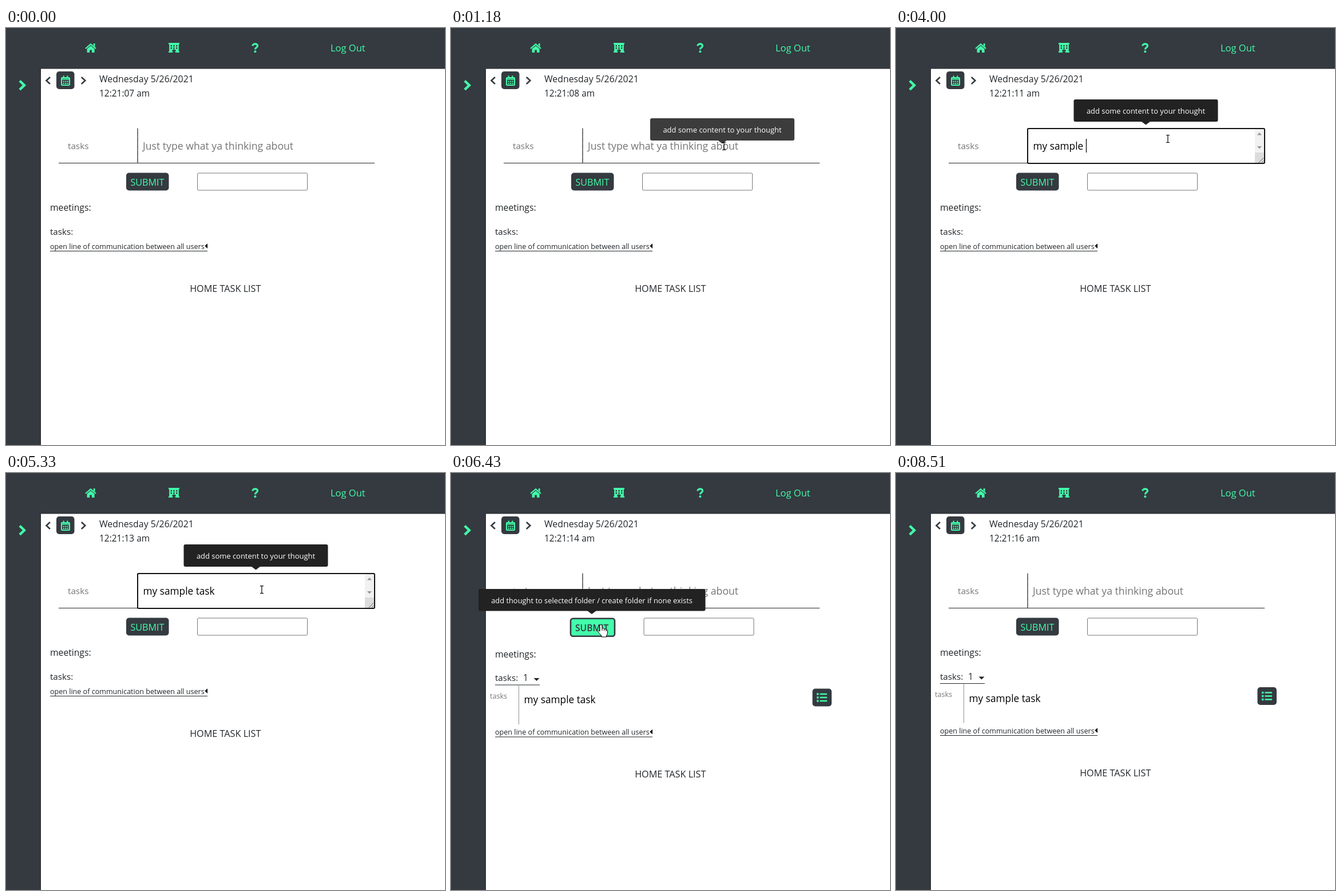
These frames come from a looping animation (767 by 730 pixels, 8.9 s). An HTML page:

```html
<!DOCTYPE html>
<html lang="en">
<head>
<meta charset="utf-8">
<title>Task planner</title>
<style>
  html, body { margin: 0; width: 100%; height: 100%; overflow: hidden; background: #fff; }
  svg { display: block; font-family: "Open Sans", "Noto Sans", sans-serif; fill: #212529; }
  text { white-space: pre; }
  .dark { fill: #343a40; }
  .green { fill: #43fdaa; }
  .line { fill: none; stroke: #343a40; }
  .line.green { stroke: #43fdaa; }
  .hint { fill: #757575; }
  .rule { stroke: #212529; fill: none; }
  .typed { font-size: 17.25px; fill: #000; }
  .tip { fill: #222; }
  .tip text { fill: #fff; }
  .cursor { fill: #fff; stroke: #000; stroke-linejoin: round; }
</style>
</head>
<body>
<svg width="767" height="730" viewBox="0 0 767 730">
  <rect class="dark" width="767" height="71"/>
  <rect class="dark" width="61" height="730"/>
  <path d="M767 71H60.5V730" fill="none" stroke="#24282c"/>

  <!-- navigation -->
  <path class="line green" d="M139 36L148 28.3L157 36" stroke-width="2.2"/>
  <path class="green" d="M152.8 27h2.7v6l-2.7-2.4zM141.6 36.6L148 31.2L154.6 36.6V43H150V38.4H146.2V43H141.6z"/>
  <path class="green" fill-rule="evenodd" d="M284 26h19v2.4h-1.2v12.4h1.2V43h-7.2v-2.4h-4.6V43H284v-2.2h1.2V28.4H284z"/>
  <path class="dark" d="M287.6 30h2.4v2.4h-2.4zM292.3 30h2.4v2.4h-2.4zM297 30h2.4v2.4H297zM287.6 34h2.4v2.4h-2.4zM292.3 34h2.4v2.4h-2.4zM297 34h2.4v2.4H297zM290 40.6a3.5 3.2 0 0 1 7 0z"/>
  <path class="line green" d="M430.8 31.4C431 26.6 440 26.6 439.5 31.3C439.2 34.2 435.4 34 435.4 37.6" stroke-width="3.2"/>
  <circle class="green" cx="435.4" cy="41.2" r="2"/>
  <text class="green" x="567" y="41" font-size="16.5">Log Out</text>
  <path class="line green" d="M24 92.5l8 7.7-8 7.7" stroke-width="4.3"/>

  <!-- date -->
  <path class="line" d="M77 86l-6.5 6 6.5 6M131.8 86l6.5 6-6.5 6" stroke-width="2.6"/>
  <rect class="dark" x="88" y="76" width="31.5" height="31" rx="5"/>
  <path class="line green" d="M98 87H110Q111 87 111 88V99Q111 100 110 100H98Q97 100 97 99V88Q97 87 98 87zM97 89.5H111M100.7 83.5V88M107.3 83.5V88" stroke-width="2"/>
  <path class="line green" d="M99.6 93.4H109M99.6 97H109" stroke-width="2" stroke-dasharray="2.2 1.3"/>
  <text x="163" y="95" font-size="15.85">Wednesday 5/26/2021</text>
  <text id="clock" x="163" y="120" font-size="15.45"></text>

  <!-- entry form -->
  <text class="hint" x="108" y="212" font-size="15.25">tasks</text>
  <path class="rule" d="M92 236.5H644"/>
  <path d="M230 176V237" stroke="#000" stroke-width="1.6" stroke-dasharray="1.6 .8"/>
  <g id="focusRing">
    <rect x="627" y="177" width="16" height="41" fill="#f1f1f1"/>
    <rect x="627" y="218" width="16" height="18" fill="#dcdcdc"/>
    <path d="M631 187.5l4-4.5 4 4.5zM631 207l4 4.5 4-4.5z" fill="#959595"/>
    <path d="M634 235.5l8-8M639 235.5l3-3" stroke="#555"/>
    <rect x="230" y="176" width="414" height="61" rx="2" fill="none" stroke="#101010" stroke-width="2"/>
  </g>
  <text id="placeholder" class="hint" x="239" y="213" font-size="17.65">Just type what ya thinking about</text>
  <text id="entry" class="typed" x="239.5" y="213"></text>
  <rect id="caret" y="194" width="1.2" height="24" fill="#000"/>

  <g id="buttonIdle">
    <rect class="dark" x="210" y="253.5" width="74.5" height="31" rx="5"/>
    <text class="green" x="217.5" y="276" font-size="16.1">SUBMIT</text>
  </g>
  <g id="buttonHover">
    <rect class="green" x="209" y="254.7" width="77" height="31" rx="4" stroke="#343a40" stroke-width="2.6"/>
    <text class="dark" x="217" y="277" font-size="15.6" font-weight="600">SUBMIT</text>
  </g>
  <rect id="folder" x="334.5" y="254" width="192" height="30" rx="2" fill="#fff" stroke="#767676"/>

  <!-- lists -->
  <g id="lists">
    <text x="77" y="320" font-size="15.7">meetings:</text>
    <text x="77" y="361.5" font-size="15.2">tasks:</text>
    <g id="newTask">
      <text x="126" y="361.5" font-size="15.5">1</text>
      <path d="M144.5 356.5H154.5L149.5 361.5z"/>
      <path class="rule" d="M77 368.5H155"/>
      <text class="hint" x="68" y="392" font-size="12.6">tasks</text>
      <path class="rule" d="M118.5 370V437" stroke-dasharray="1 1"/>
      <text class="typed" x="127.5" y="400.5">my sample task</text>
      <rect class="dark" x="631.5" y="375" width="33.5" height="31" rx="5"/>
      <path class="line green" d="M639 384.5h3.4M639 390.5h3.4M639 396.5h3.4" stroke-width="3.4"/>
      <path class="line green" d="M644.5 384.5H657M644.5 390.5H657M644.5 396.5H657" stroke-width="2.3"/>
    </g>
    <g id="footer">
      <text x="77" y="386.5" font-size="12.55">open line of communication between all users</text>
      <path d="M352 377.3V386L347.3 381.6z" fill="#000"/>
      <path class="rule" d="M77 390.5H352"/>
      <text x="383.3" y="461.5" font-size="16.2" text-anchor="middle">HOME TASK LIST</text>
    </g>
  </g>

  <!-- tooltips: origin at top centre -->
  <g id="entryTip" class="tip">
    <rect x="-126" width="252" height="39" rx="3"/>
    <path d="M-8 38.5H8L0 44.5z"/>
    <text y="25" font-size="12.95" text-anchor="middle">add some content to your thought</text>
  </g>
  <g id="submitTip" class="tip">
    <rect x="-198" width="396.5" height="38.5" rx="3"/>
    <path d="M-8 38H8L0 44z"/>
    <text y="25" font-size="12.88" text-anchor="middle">add thought to selected folder / create folder if none exists</text>
  </g>

  <!-- cursors: origin at hot spot -->
  <path id="arrow" class="cursor" d="M0 0V16.5L3.8 12.8L6.4 18.7L8.8 17.6L6.2 11.8H11.6z"/>
  <path id="beam" d="M-3-6.5H-1Q0-6.5 0-5.5Q0-6.5 1-6.5H3M0-6V6M-3 6.5H-1Q0 6.5 0 5.5Q0 6.5 1 6.5H3" fill="none" stroke="#000" stroke-width="1.2"/>
  <path id="hand" class="cursor" d="M-2 2Q0-1.5 2 2V7Q5 5.5 5.7 8Q8.5 7 9 9.5Q11.5 8.8 11.5 12V15Q11 18 9.5 20V22H1V20Q-3 15.5-5.5 12.5Q-5.8 9.8-2 12zM2 7V11M5.7 8V11.5M9 9.5V12"/>
</svg>
<script>
const LOOP = 8900;
const FOCUS = 1460, CLICK = 6100, CLEARED = 6170, LISTED = 6300, BLINK = 530;
const MESSAGE = 'my sample task';
const KEY_TIMES = [2390, 2650, 2740, 2830, 2920, 3470, 3540, 3740, 3870, 4000, 4200, 4330, 4400, 4530];
// time, x, y of the mouse
const MOUSE = [
  [140, 686, 588], [280, 600, 359], [550, 600, 359], [985, 481, 229], [1180, 477, 207], [1390, 475, 194],
  [5260, 475, 194], [5740, 285, 262], [5820, 271, 265], [6000, 262, 265],
  [7230, 262, 265], [7640, 468, 546], [7970, 468, 546], [8510, 716, 735]
];
const ENTRY_BOX = [230, 176, 644, 238], FOLDER_BOX = [334, 254, 527, 285], BUTTON_BOX = [208, 253, 287, 287];

const el = {};
document.querySelectorAll('[id]').forEach(node => el[node.id] = node);

const show = (node, on) => node.setAttribute('display', on ? 'inline' : 'none');
const move = (node, x, y) => node.setAttribute('transform', `translate(${x} ${y})`);
const inside = ([x, y], [left, top, right, bottom]) => x >= left && x <= right && y >= top && y <= bottom;
const fade = p => 1 - (1 - Math.min(1, Math.max(0, p))) ** 2;

function mouseAt(t) {
  const next = MOUSE.findIndex(key => key[0] > t);
  if (next < 1) return [-99, -99];
  const [t0, x0, y0] = MOUSE[next - 1], [t1, x1, y1] = MOUSE[next];
  const p = (t - t0) / (t1 - t0);
  return [x0 + (x1 - x0) * p, y0 + (y1 - y0) * p];
}

function placeTip(node, on, opacity, x, y) {
  show(node, on);
  node.setAttribute('opacity', opacity);
  move(node, x, y);
}

function draw(t) {
  const mouse = mouseAt(t), [x, y] = mouse;
  const overEntry = inside(mouse, ENTRY_BOX), overButton = inside(mouse, BUTTON_BOX);
  const overText = overEntry || inside(mouse, FOLDER_BOX);
  const focused = t >= FOCUS && t < CLICK;

  const second = 8 + Math.floor((t - 260) / 1000);
  el.clock.textContent = `12:21:${String(second).padStart(2, '0')} am`;

  const count = t < CLEARED ? KEY_TIMES.filter(key => key <= t).length : 0;
  el.entry.textContent = MESSAGE.slice(0, count);
  show(el.placeholder, !count);
  show(el.focusRing, focused);
  const lastKey = count ? KEY_TIMES[count - 1] : FOCUS;
  show(el.caret, focused && Math.floor((t - lastKey) / BLINK) % 2 === 0);
  el.caret.setAttribute('x', 239.7 + (count ? el.entry.getComputedTextLength() : 0));

  const shift = overButton ? 2.5 : 0;
  show(el.buttonIdle, !overButton);
  show(el.buttonHover, overButton);
  move(el.folder, shift, 0);
  move(el.lists, 0, shift);
  show(el.newTask, t >= LISTED);
  move(el.footer, 0, t >= LISTED ? 69 : 0);

  placeTip(el.entryTip, overEntry, fade((t - 985) / 300),
    ...(focused ? [436.5, 125] : [x - 3, y - 49]));
  placeTip(el.submitTip, overButton, fade((t - 5748) / 300),
    ...(t >= CLICK ? [246, 203] : [x + 4, y - 53]));

  show(el.beam, overText);
  show(el.hand, overButton);
  show(el.arrow, !overText && !overButton);
  for (const cursor of [el.beam, el.hand, el.arrow]) move(cursor, x, y);
}

const start = performance.now();
function tick() {
  draw((performance.now() - start) % LOOP);
  requestAnimationFrame(tick);
}
tick();
</script>
</body>
</html>
```
